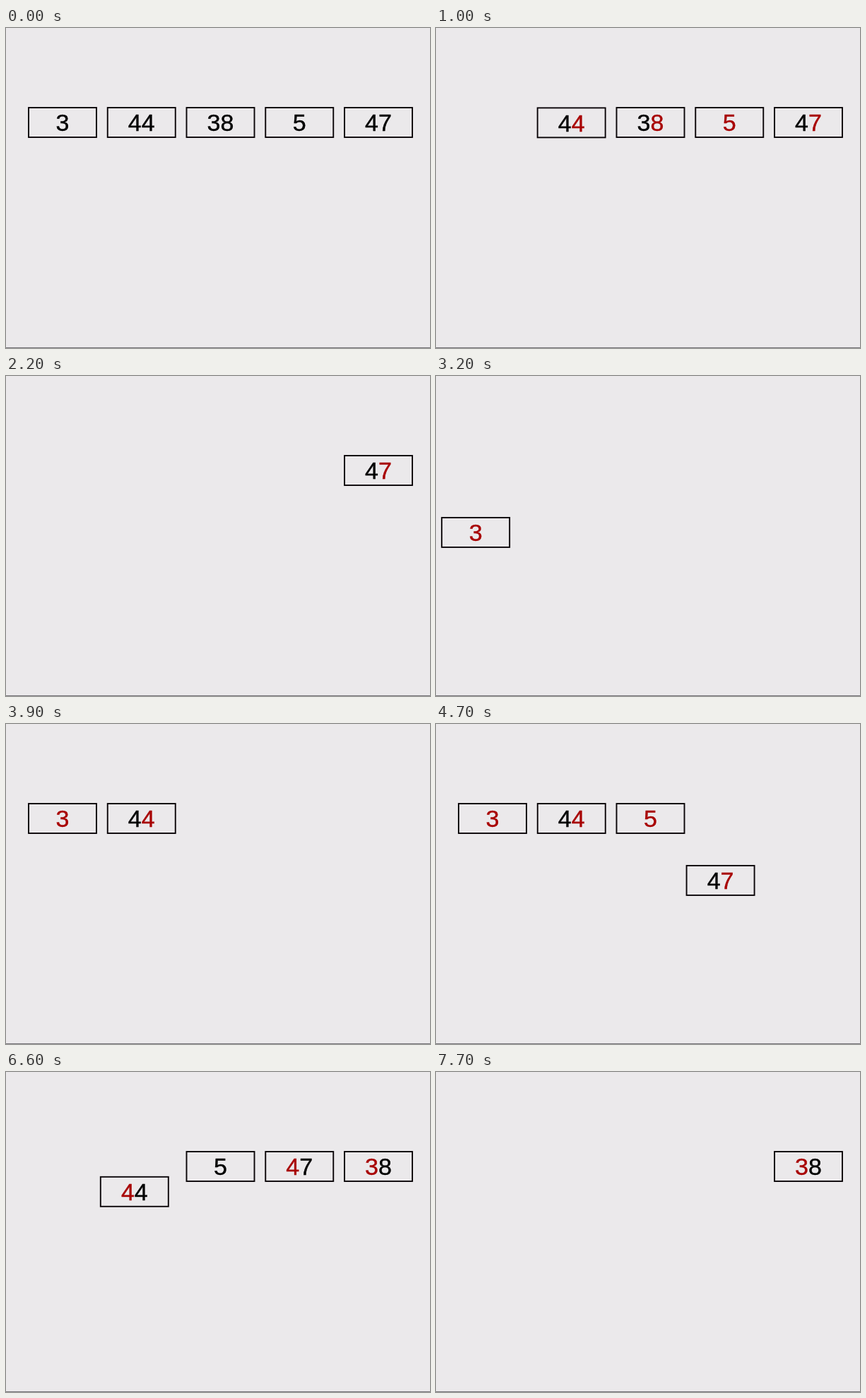
Write an HTML page that moves like this. It is 600x454 px and loops after 8000 ms.

```html
<!DOCTYPE html>
<html lang="en">
<head>
<meta charset="utf-8">
<title>Radix sort</title>
<style>
  html, body { margin: 0; width: 100%; height: 100%; overflow: hidden; background: #ebe9eb; }
  svg { display: block; width: 600px; height: 454px; }
  rect { fill: none; stroke: #0a0508; stroke-width: 1.9; }
  text { font: 34px "Liberation Sans", Arial, sans-serif; text-anchor: middle; }
  tspan { fill: #000; stroke: #000; stroke-width: .4; }
  tspan.on { fill: #a80202; stroke: #a80202; }
  line { stroke: #77757a; }
</style>
</head>
<body>
<svg id="stage" viewBox="0 0 600 454">
  <line x1="0" y1="453.5" x2="600" y2="453.5"/>
</svg>
<script>
const LOOP = 8000, STEP = 100, MOVE = 360, DROP = 730;
const UNITS_AT = 100, TENS_AT = 5600;
const NEVER = LOOP * 2;

// from/to: slot before and after the first pass
// out: drop into the units bin, back: rise from it, last: drop into the tens bin
const cards = [
  { value: 3,  from: 0, to: 0, out: 514,  back: 2952, last: 5988 },
  { value: 44, from: 1, to: 1, out: 982,  back: 3455, last: 6517 },
  { value: 38, from: 2, to: 4, out: 1512, back: 4947, last: NEVER },
  { value: 5,  from: 3, to: 2, out: 1984, back: 3944, last: 6990 },
  { value: 47, from: 4, to: 3, out: 2516, back: 4452, last: 7520 }
];

const stage = document.getElementById("stage");
const slotX = i => 32 + 111.75 * i;
const binX = digit => -487 + 107 * digit;

function add(parent, tag, attrs = {}, label = "") {
  const el = document.createElementNS("http://www.w3.org/2000/svg", tag);
  for (const key in attrs) el.setAttribute(key, attrs[key]);
  el.textContent = label;
  return parent.appendChild(el);
}

// cubic ease in and out, clamped to the move
function ease(ms) {
  const p = Math.min(1, Math.max(0, ms / MOVE));
  return p < .5 ? 4 * p ** 3 : 1 - 4 * (1 - p) ** 3;
}

for (const card of cards) {
  card.units = card.value % 10;
  card.tens = Math.floor(card.value / 10);
  card.group = add(stage, "g");
  add(card.group, "rect", { width: 96, height: 42 });
  const text = add(card.group, "text", { x: 48, y: 33.3 });
  if (card.tens) card.tensEl = add(text, "tspan", {}, card.tens);
  card.unitsEl = add(text, "tspan", {}, card.units);
}

// depth runs from 0 in the slot to 1 in the bin
function place(card, t) {
  if (t < card.back) return [card.from, card.units, ease(t - card.out)];
  if (t < card.last) return [card.to, card.units, 1 - ease(t - card.back)];
  return [card.to, card.tens, ease(t - card.last)];
}

function draw(t) {
  for (const card of cards) {
    const [slot, digit, depth] = place(card, t);
    const x = slotX(slot) + (binX(digit) - slotX(slot)) * depth;
    const y = 113 + DROP * depth;
    card.group.setAttribute("transform", `translate(${x.toFixed(2)} ${y.toFixed(2)})`);
    card.unitsEl.classList.toggle("on", t >= UNITS_AT && t < TENS_AT);
    if (card.tensEl) card.tensEl.classList.toggle("on", t >= TENS_AT);
  }
}

const begin = performance.now();
function tick() {
  const t = (performance.now() - begin) % LOOP;
  draw(Math.floor(t / STEP) * STEP);
  requestAnimationFrame(tick);
}
tick();
</script>
</body>
</html>
```
